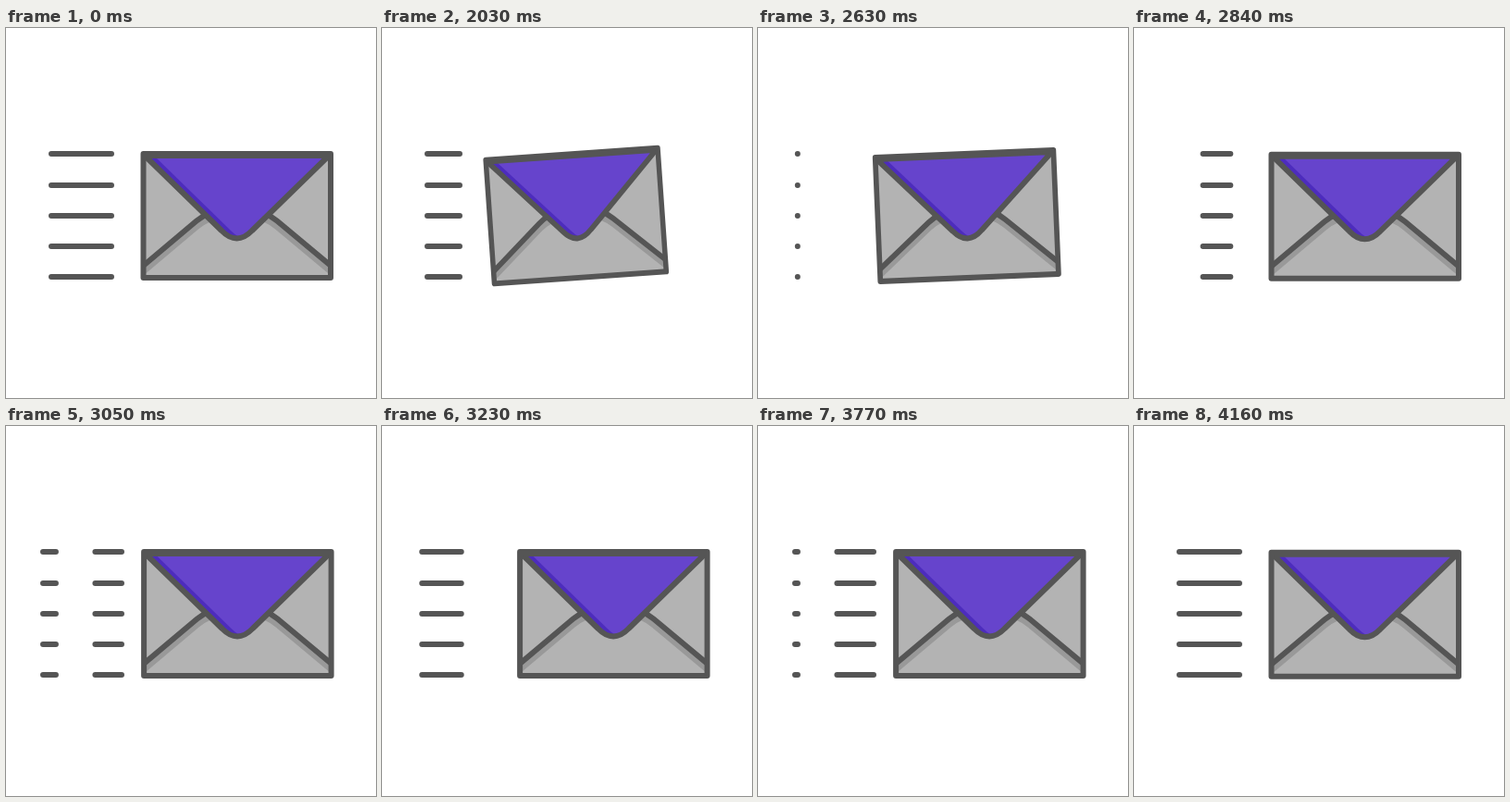
These frames come from a looping animation (400x400 px, 4220 ms). An HTML page:

```html
<!DOCTYPE html>
<html lang="en">
<head>
<meta charset="utf-8">
<title>Speeding envelope</title>
<style>
  html, body { margin: 0; width: 100%; height: 100%; overflow: hidden; background: #fff; }
  svg { display: block; width: 100%; height: 100%; }
  .ink { fill: none; stroke: #555; stroke-width: 6; stroke-linecap: round; stroke-linejoin: round; }
</style>
</head>
<body>
<svg viewBox="0 0 400 400">
  <defs>
    <path id="flap" d="M150 138 L233 219 Q249.5 236 266 219 L349 138 Z"/>
    <path id="folds" d="M149 256.500 L206 208.500 Q212 203.500 220 200 M350.500 256.500 L293 208.500 Q287 203.500 279 200"/>
    <clipPath id="inFlap"><use href="#flap"/></clipPath>
    <clipPath id="inBody"><rect x="148.500" y="136" width="202.500" height="134"/></clipPath>
  </defs>
  <path id="trails" class="ink"/>
  <g id="envelope">
    <rect x="148.500" y="136" width="202.500" height="134" fill="#b3b3b3"/>
    <g clip-path="url(#inBody)">
      <use href="#folds" y="6" fill="none" stroke="#999" stroke-width="7"/>
      <use href="#folds" class="ink"/>
    </g>
    <use href="#flap" fill="#4d2cbd"/>
    <g clip-path="url(#inFlap)"><use href="#flap" x="10" fill="#6644cc"/></g>
    <use href="#flap" class="ink"/>
    <rect class="ink" x="148.500" y="136" width="202.500" height="134"/>
  </g>
</svg>
<script>
const LOOP = 4220, HOLD = 2030, STEP = 30, LAST = 71;
const LEFT = 40, SPAN = 85, REST = 49, FULL = 65, HALF = 42.5;
const ROWS = [136, 170, 203, 236, 269];
const LAUNCH = 18, TURNS = 4;
const envelope = document.getElementById('envelope');
const trails = document.getElementById('trails');

const ramp = (k, from, to) => Math.min(1, Math.max(0, (k - from) / (to - from)));
const smooth = x => x * x * (3 - 2 * x);

// Cubic bezier ease with control points (x1, 0) and (x2, 1)
function ease(x, x1, x2) {
  let lo = 0, hi = 1;
  for (let i = 0; i < 30; i++) {
    const b = (lo + hi) / 2, c = 1 - b;
    if (3 * c * c * b * x1 + 3 * c * b * b * x2 + b * b * b < x) lo = b;
    else hi = b;
  }
  return smooth(hi);
}

const settle = k => Math.pow(1 - ramp(k, 0, 10), 2.5);

// How far the envelope is drawn back: 0 at rest, 1 fully wound up
function pullAt(k) {
  if (k < 0) return 0;
  return k <= 17 ? 1 - 0.6 * settle(k) : 1 - smooth(ramp(k, 17, 21.4));
}

function lengthAt(k) {
  if (k < 0) return FULL;
  if (k < LAUNCH) return 35 * settle(k);
  return HALF * smooth(ramp(k, 20, 31)) + (FULL - HALF) * smooth(ramp(k, 58, LAST));
}

function trailPath(start, length) {
  const a = LEFT + ((start - LEFT) % SPAN + SPAN) % SPAN;
  const over = a + length - LEFT - SPAN;
  const parts = over > 0 ? [[a, length - over], [LEFT, over]] : [[a, length]];
  return ROWS.map(y => parts.map(([x, w]) => `M${x} ${y}h${Math.max(w, 0.01)}`).join('')).join('');
}

function draw(time) {
  const t = time % LOOP;
  const k = Math.min(LAST, Math.floor((t - HOLD + 0.01) / STEP));
  const pull = pullAt(k);
  const shaking = k >= 22;
  const dx = shaking && k % 2 === 0 ? 0.6 : 0;
  const dy = shaking && k % 2 === 1 ? 0.8 : 0;
  envelope.setAttribute('transform',
    `translate(${249.75 - 100 * pull + dx} ${203 + dy}) rotate(${-10 * pull}) ` +
    `scale(${1 - 0.2 * pull} 1) translate(-249.75 -203)`);
  const travel = SPAN * TURNS * ease(ramp(k, LAUNCH, LAST), 0.13, 0.61);
  trails.setAttribute('d', trailPath(REST - (k > LAUNCH ? travel : 0), lengthAt(k)));
}

const began = performance.now();
function tick() {
  draw(performance.now() - began);
  requestAnimationFrame(tick);
}
tick();
</script>
</body>
</html>
```
